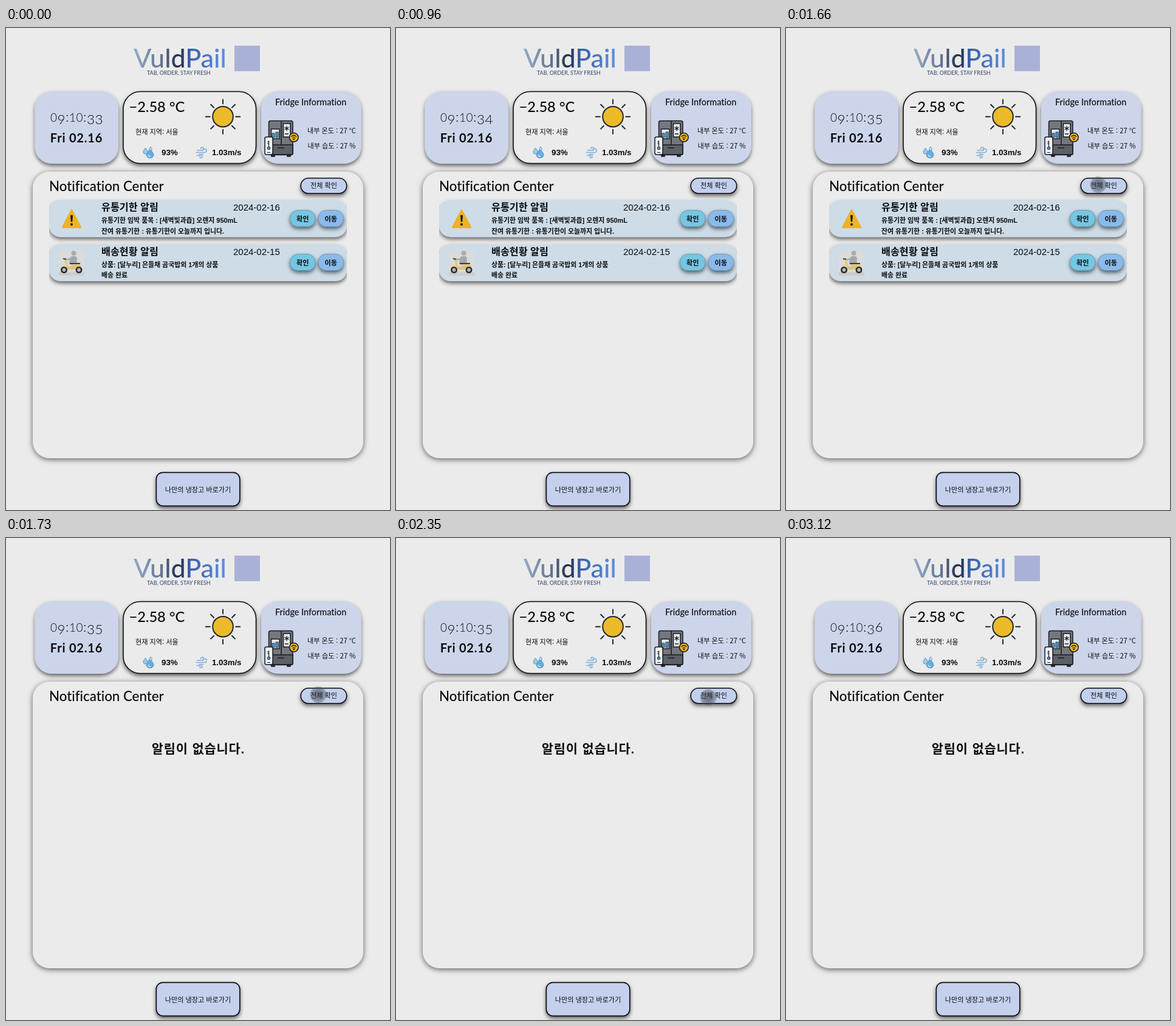
An HTML page that plays this animation: 632 px wide and 792 px high, repeating every 3190 ms.

```html
<!DOCTYPE html>
<html lang="ko">
<head>
<meta charset="utf-8">
<title>Fridge dashboard</title>
<style>
html, body { margin: 0; width: 100%; height: 100%; overflow: hidden; background: #ebebeb; }
svg { position: absolute; left: 0; top: 0; width: 632px; height: 792px; }
text { fill: #0b0b0d; white-space: pre; font-variant-ligatures: none; }
.lato { font-family: Lato, "Open Sans", sans-serif; }
.ko { font: 500 11.1px "Noto Sans CJK KR", "Noto Sans KR", "Noto Sans CJK", sans-serif; }
.arial { font-family: "Liberation Sans", Arial, "Noto Sans CJK KR", "Noto Sans CJK", sans-serif; }
.body { font-size: 10.9px; font-weight: 600; }
.mid { text-anchor: middle; }
#clock { font-weight: 300; font-size: 22.4px; letter-spacing: .5px; }
#clock .small { font-size: 19px; }
</style>
</head>
<body>
<svg viewBox="0 0 632 792">
  <defs>
    <filter id="shadow" x="-40%" y="-40%" width="180%" height="190%">
      <feDropShadow dx="0" dy="3.5" stdDeviation="3.4" flood-color="#000" flood-opacity=".58"/>
    </filter>
    <filter id="panel" x="-5%" y="-5%" width="110%" height="110%">
      <feDropShadow dx="0" dy="2" stdDeviation="5" flood-color="#000" flood-opacity=".62"/>
    </filter>
    <linearGradient id="ink" gradientUnits="userSpaceOnUse" x1="211" y1="0" x2="365" y2="0">
      <stop offset="0" stop-color="#93abc6"/>
      <stop offset=".3" stop-color="#61728f"/>
      <stop offset=".48" stop-color="#1d2846"/>
      <stop offset=".58" stop-color="#385da8"/>
      <stop offset="1" stop-color="#5f92e2"/>
    </linearGradient>
    <radialGradient id="press">
      <stop offset=".4" stop-color="#34383f" stop-opacity=".58"/>
      <stop offset="1" stop-color="#4b515b" stop-opacity=".34"/>
    </radialGradient>
    <clipPath id="list"><rect x="71" y="276" width="490" height="420"/></clipPath>
    <clipPath id="photo"><rect x="87" y="365" width="42" height="42"/></clipPath>
  </defs>

  <!-- brand -->
  <text class="lato" x="210" y="65" font-size="43" font-weight="500" style="fill:url(#ink)">VuldPail</text>
  <text class="lato" x="232" y="77" font-size="8.9" style="fill:#34436b">TAB, ORDER, STAY FRESH</text>
  <rect x="376" y="29" width="42" height="42" fill="#a9b2d6"/>

  <!-- top cards -->
  <g filter="url(#shadow)">
    <rect x="47.5" y="104" width="137.5" height="119" rx="28" fill="#ccd5ea"/>
    <rect x="420" y="104" width="164.5" height="119" rx="28" fill="#ccd5ea"/>
    <rect x="193" y="104.5" width="218.5" height="118" rx="28" fill="#ebebeb" stroke="#111" stroke-width="1.6"/>
  </g>
  <text id="clock" class="lato mid" x="116.5" y="154.3"></text>
  <text class="lato mid" x="116" y="188" font-size="20" font-weight="700" letter-spacing=".8">Fri 02.16</text>

  <!-- weather -->
  <text class="lato" x="202.5" y="138" font-size="23.6" font-weight="500">−2.58 °C</text>
  <text class="ko" x="213" y="174.5">현재 지역: 서울</text>
  <g id="sun" stroke="#25262a" stroke-width="2" stroke-linecap="round">
    <circle cx="357" cy="145.7" r="16.8" fill="#ebbb2b"/>
  </g>
  <g stroke="#3f7fb2" stroke-width=".7">
    <path d="M237 199c4.500 5 6 7.500 6 9.500a6 5.200 0 0 1-12 0c0-2 1.500-4.500 6-9.500z" fill="#64addf"/>
    <path d="M229.500 197c2.700 3.500 3.600 5 3.600 6.500a3.600 3.600 0 0 1-7.200 0c0-1.500.9-3 3.600-6.500z" fill="#9acbec"/>
    <path d="M238 195c1.800 2.300 2.300 3.200 2.300 4a2.300 2.300 0 0 1-4.600 0c0-.8.500-1.700 2.300-4z" fill="#b4dcf2"/>
    <path d="M234 208.500q1 3 4 3" fill="none" stroke="#dceffa" stroke-width="1.400"/>
  </g>
  <g fill="none" stroke="#7fb0d9" stroke-width="1.5" stroke-linecap="round">
    <path d="M315 201h8a2.500 2.500 0 1 0-2.500-2.500M313 204.500h14a3 3 0 1 0-3-3M318 207.500h7M314 209.500h7a2 2 0 1 1-2 2"/>
  </g>
  <text class="arial" x="256" y="209" font-size="13.3" font-weight="700">93%</text>
  <text class="arial" x="339" y="209" font-size="13.2" font-weight="700">1.03m/s</text>

  <!-- fridge -->
  <text class="lato" x="443" y="127" font-size="14.4" font-weight="500">Fridge Information</text>
  <g stroke="#191a1d" stroke-width="1.5">
    <path d="M437 208v3h5v-3M463 208v3h5v-3" fill="#303238"/>
    <rect x="432.5" y="152.5" width="39.5" height="56" rx="3" fill="#74777e"/>
    <path d="M433 192h39v14q0 2-2 2h-35q-2 0-2-2z" fill="#5d6067"/>
    <path d="M453 153v39M447 197h11" fill="none"/>
    <rect x="436.500" y="166" width="13.500" height="16" fill="#dce8f0"/>
    <rect x="456.500" y="157" width="11.500" height="22" fill="#e4eaf0"/>
    <path d="M438 180v-7h4v7zM444 180v-9h4v9z" fill="#4a9bd8" stroke-width=".8"/>
    <path d="M462 161v8M458.500 163l7 4M458.500 167l7-4M459 174h6" fill="none" stroke-width="1.3"/>
    <rect x="426" y="179" width="13" height="29" rx="2.5" fill="#eef1f5"/>
    <path d="M432.500 185v10M430 187h2M430 190h2" fill="none" stroke-width="1.2"/>
    <circle cx="432.5" cy="197.5" r="2.3" fill="#4a9bd8" stroke-width="1"/>
    <path d="M430 204.500h5" stroke-width="1"/>
    <circle cx="473.8" cy="179.700" r="7.3" fill="#efb42c"/>
    <path d="M469.500 178.500q4.300-4 8.600 0M471.500 181q2.300-2 4.600 0" fill="none" stroke-width="1.2"/>
    <circle cx="473.8" cy="183" r=".6"/>
  </g>
  <text class="ko" x="496" y="172.5">내부 온도 : 27 °C</text>
  <text class="ko" x="496.5" y="197.5">내부 습도 : 27 %</text>

  <!-- notification panel -->
  <rect x="44" y="236" width="544" height="471" rx="28" fill="#ebebeb" filter="url(#panel)"/>
  <text class="lato" x="71" y="268" font-size="22.3" font-weight="500">Notification Center</text>
  <rect x="485.2" y="246.8" width="75.5" height="25" rx="12.5" fill="#c3d0ed" stroke="#101114" stroke-width="1.6" filter="url(#shadow)"/>
  <text class="ko mid" x="523" y="263.3">전체 확인</text>

  <g id="rows">
    <g clip-path="url(#list)">
      <g filter="url(#shadow)" fill="#cddce7">
        <rect x="71" y="283" width="490" height="60.5" rx="19"/>
        <rect x="71" y="355.5" width="490" height="60.5" rx="19"/>
      </g>
    </g>
    <path d="M108 299.500L122.500 327.500H93.500Z" fill="#edb323" stroke="#edb323" stroke-width="3" stroke-linejoin="round"/>
    <path d="M106 307.500h4l-.8 11h-2.400z" fill="#17171a"/>
    <circle cx="108" cy="322.8" r="2" fill="#17171a"/>

    <g clip-path="url(#photo)">
      <rect x="87" y="365" width="42" height="42" fill="#d9dbdc"/>
      <path d="M87 401h42v6h-42z" fill="#cbcdce"/>
      <path d="M104 388l1-9q1-4 5-4h4q3 1 3 5l-1 9-5 8h-5l3-8z" fill="#a4a8ac"/>
      <circle cx="111.5" cy="370" r="4" fill="#a9adb0"/>
      <path d="M108 379l-10 2" stroke="#a4a8ac" stroke-width="2.5"/>
      <path d="M96 379l3 14q1 4 5 4h10l8-1q3-5-1-8h-11l-4 4-4-1-3-13z" fill="#dfc57c"/>
      <path d="M94 379l5 1M105 387h17" stroke="#3c3b39" stroke-width="2"/>
      <path d="M90 394q2-7 10-4l1 5z" fill="#e8d49a"/>
      <g fill="#b7b7b5" stroke="#2e2d2c" stroke-width="2.6">
        <circle cx="95.5" cy="397.5" r="4.2"/>
        <circle cx="120" cy="397.5" r="4.2"/>
      </g>
    </g>

    <g class="arial">
      <g font-size="16.2" font-weight="700">
        <text x="157" y="300">유통기한 알림</text>
        <text x="157" y="373">배송현황 알림</text>
      </g>
      <text x="374" y="300" font-size="15">2024-02-16</text>
      <text x="374" y="373" font-size="15">2024-02-15</text>
      <g class="body">
        <text x="157" y="320">유통기한 임박 품목 : [새벽빛과즙] 오렌지 950mL</text>
        <text x="157" y="338">잔여 유통기한 : 유통기한이 오늘까지 입니다.</text>
        <text x="157" y="393">상품: [달누리] 은들채 곰국밥외 1개의 상품</text>
        <text x="157" y="410">배송 완료</text>
      </g>
    </g>
    <g id="pills"></g>
  </g>
  <text id="empty" class="arial mid" x="316.5" y="353.5" font-size="20.8" font-weight="700" letter-spacing=".9">알림이 없습니다.</text>

  <rect x="247.3" y="730.3" width="137.5" height="55" rx="11" fill="#c4d0ec" stroke="#101114" stroke-width="1.7" filter="url(#shadow)"/>
  <text class="ko mid" x="316" y="762.5">나만의 냉장고 바로가기</text>

  <circle id="touch" cx="514" cy="257.5" r="13.5" fill="url(#press)"/>
</svg>
<script>
const LOOP = 3190;
const TICKS = [540, 1540, 2550];
const CLEARED = 1725;
const TOUCH = { from: 1590, to: 2480 };
const $ = id => document.getElementById(id);

function add(parent, tag, attrs, label) {
  const el = document.createElementNS("http://www.w3.org/2000/svg", tag);
  for (const key in attrs) el.setAttribute(key, attrs[key]);
  if (label) el.textContent = label;
  parent.appendChild(el);
  return el;
}

for (let i = 0; i < 8; i++) {
  add($("sun"), "path", { d: "M357 124.500v-7", transform: `rotate(${i * 45} 357 145.7)` });
}

function pill(x, y, fill, label) {
  add($("pills"), "rect", {
    x, y, width: 41.5, height: 27, rx: 13, fill,
    stroke: "#517f9b", "stroke-width": .6, filter: "url(#shadow)"
  });
  add($("pills"), "text", { x: x + 20.8, y: y + 18, class: "ko mid", style: "font-weight:700" }, label);
}
for (const y of [299.5, 371.5]) {
  pill(467.5, y, "#75c6e2", "확인");
  pill(514, y, "#8abaea", "이동");
}

// Old-style figures: 0-2 are short, 3-5, 7 and 9 hang below the line.
function setClock(value) {
  const clock = $("clock");
  clock.textContent = "";
  let base = 0;
  for (const c of value) {
    const drop = "34579".includes(c) ? 4 : 0;
    add(clock, "tspan", { dy: drop - base, class: "012".includes(c) ? "small" : "" }, c);
    base = drop;
  }
}

let shown = -1;
function draw() {
  const t = performance.now() % LOOP;
  const second = 33 + TICKS.filter(at => t >= at).length;
  if (second !== shown) setClock("09:10:" + (shown = second));

  const cleared = t >= CLEARED;
  $("rows").style.display = cleared ? "none" : "";
  $("empty").style.display = cleared ? "" : "none";

  const p = Math.min(1, Math.max(0, (t - 1750) / 550));
  const fade = Math.min(1, (t - TOUCH.from) / 50, (TOUCH.to - t) / 70);
  $("touch").setAttribute("cy", 257.5 + 4.5 * p * p * (3 - 2 * p));
  $("touch").style.opacity = Math.max(0, fade);
  requestAnimationFrame(draw);
}
draw();
</script>
</body>
</html>
```
